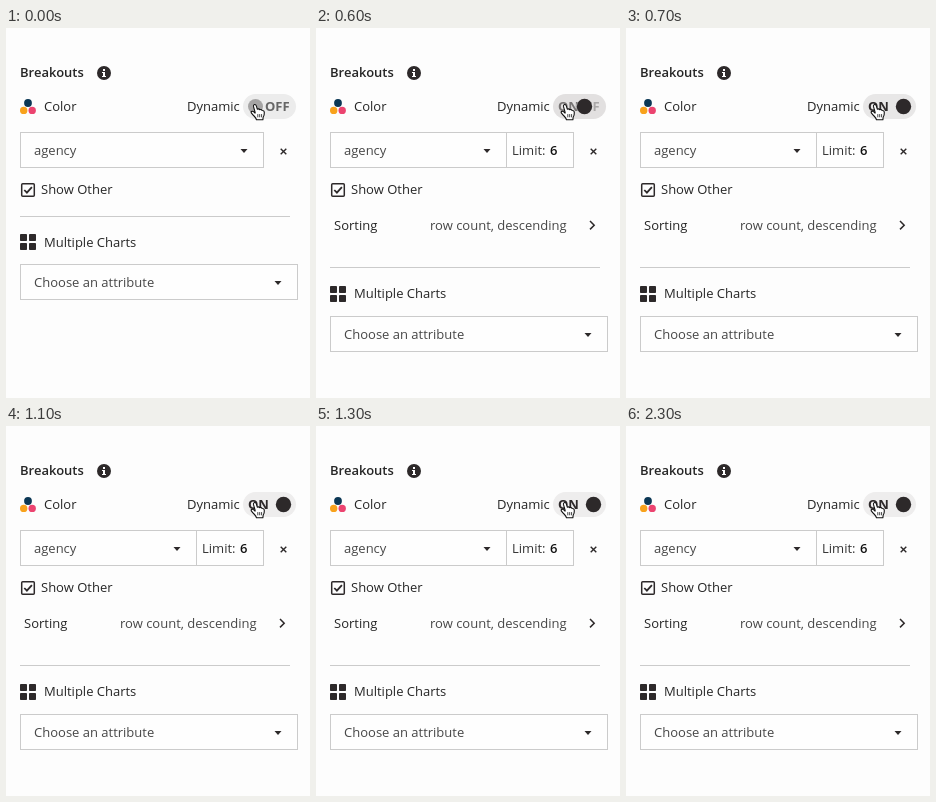
Animation of 304 by 370 pixels, one loop 2.4 s. Source, as an HTML page with a canvas:

```html
<!DOCTYPE html>
<html lang="en">
<head>
<meta charset="utf-8">
<title>Breakouts panel</title>
<style>
html, body { margin: 0; width: 100%; height: 100%; overflow: hidden; background: #fdfdfd; }
canvas { display: block; width: 304px; height: 370px; }
</style>
</head>
<body>
<canvas id="stage"></canvas>
<script>
const W = 304, H = 370, LOOP = 2400;
const INK = '#2d292a', TEXT = '#262626', SOFT = '#474747', LINE = '#cbcbcb';
const canvas = document.getElementById('stage');
const ctx = canvas.getContext('2d');
const dpr = window.devicePixelRatio || 1;
canvas.width = W * dpr;
canvas.height = H * dpr;

const hand = new Path2D('M4.6 8.6L3 3.2Q2.6 1.3 4 1Q5.4 .8 5.9 2.6L6.8 5.6Q8.8 5 9.3 6.2' +
  'Q11.1 5.7 11.6 7Q13.6 6.8 13.8 9Q14 12 12.6 14L12.4 16.3L6 16.3Q5.6 14.6 4 13' +
  'Q2 11 .8 9.4Q.2 8 1.6 7.8Q3 7.6 4.6 9.6Z');

function text(str, x, y, color = TEXT, weight = 400) {
  ctx.font = `${weight} 13px "Open Sans", "Noto Sans", sans-serif`;
  ctx.fillStyle = color;
  ctx.fillText(str, x, y);
}

function rect(x, y, w, h, color) {
  ctx.fillStyle = color;
  ctx.fillRect(x, y, w, h);
}

function round(x, y, w, h, r, color) {
  ctx.fillStyle = color;
  ctx.beginPath();
  ctx.roundRect(x, y, w, h, r);
  ctx.fill();
}

function dot(x, y, r, color) {
  ctx.fillStyle = color;
  ctx.beginPath();
  ctx.arc(x, y, r, 0, Math.PI * 2);
  ctx.fill();
}

function stroke(path, color, width) {
  ctx.strokeStyle = color;
  ctx.lineWidth = width;
  ctx.stroke(new Path2D(path));
}

function box(x, y, w, h) {
  rect(x, y, w, h, LINE);
  rect(x + 1, y + 1, w - 2, h - 2, '#fefefe');
}

function caret(x, y) {
  ctx.fillStyle = INK;
  ctx.fill(new Path2D(`M${x - 3.5} ${y - 2}h7l-3.5 4z`));
}

function drawHeader() {
  text('Breakouts', 14, 49, TEXT, 600);
  dot(98, 45, 7, INK);
  rect(97, 41, 2, 2, '#fff');
  rect(97, 44, 2, 5, '#fff');
  rect(96, 44, 1, 1, '#fff');
  rect(96, 48, 4, 1, '#fff');
  dot(22, 75, 3.9, '#0b3755');
  dot(17.7, 82.4, 3.7, '#f8a21c');
  dot(26.2, 82.4, 3.7, '#ec4470');
  text('Color', 38, 83);
  text('Dynamic', 181, 83);
}

function drawFields(open) {
  box(14, 104, 244, 36);
  text('agency', 28, 127, SOFT);
  caret(open ? 171 : 238, 123);
  if (open) {
    rect(190, 104, 1, 36, LINE);
    text('Limit:', 196, 127, '#333');
    text('6', 234, 127, '#111', 600);
  }
  stroke('M274.7 120.7l5.6 5.6m0-5.6l-5.6 5.6', INK, 1.4);

  ctx.strokeStyle = INK;
  ctx.lineWidth = 1.5;
  ctx.beginPath();
  ctx.roundRect(15.7, 155.7, 12.6, 12.6, 1);
  ctx.stroke();
  stroke('M18.3 162l2.6 2.7 5-5.6', INK, 1.8);
  text('Show Other', 35, 166);

  if (open) {
    text('Sorting', 18, 202);
    text('row count, descending', 114, 202, SOFT);
    stroke('M274 193l4.2 4.2-4.2 4.2', INK, 1.5);
  }
}

function drawCharts(open) {
  rect(14, open ? 239 : 188, 270, 1, LINE);
  const top = open ? 258 : 206;
  for (let i = 0; i < 4; i++) {
    round(14 + (i % 2) * 9, top + (i >> 1) * 9, 7, 7, 0.8, INK);
  }
  text('Multiple Charts', 38, open ? 270 : 219);
  const y = open ? 288 : 236;
  box(14, y, 278, 36);
  text('Choose an attribute', 28, y + 23, SOFT);
  caret(272, y + 19);
}

function drawToggle(t) {
  const pill = t < 400 ? '#ececec' : t < 700 ? '#e2e0e0' : t < 900 ? '#e8e7e7' : '#eeeded';
  round(237, 66, 53, 25, 12.5, pill);
  if (t < 600) {
    text('OFF', 259, 83, '#666', 700);
    dot(249.5, 78.5, 7.5, '#a5a4a4');
  } else if (t < 700) {
    text('ON', 242, 83, '#777474', 700);
    text('OFF', 259, 83, '#aaa8a8', 700);
    dot(268.5, 78.5, 7.7, INK);
  } else {
    text('ON', 242, 83, INK, 700);
    dot(277.5, 78.5, 7.7, INK);
  }
}

function drawHand() {
  ctx.save();
  ctx.translate(244.5, 75.5);
  ctx.lineJoin = 'round';
  ctx.fillStyle = '#fff';
  ctx.fill(hand);
  ctx.strokeStyle = '#111';
  ctx.lineWidth = 1.1;
  ctx.stroke(hand);
  stroke('M7.3 10.6v3.2M9.2 10.6v3.2M11.1 10.6v3.2', '#111', 0.8);
  ctx.restore();
}

function draw(t) {
  const open = t >= 600;
  ctx.setTransform(dpr, 0, 0, dpr, 0, 0);
  rect(0, 0, W, H, '#fdfdfd');
  drawHeader();
  drawFields(open);
  drawCharts(open);
  drawToggle(t);
  drawHand();
}

const start = performance.now();
function tick() {
  draw((performance.now() - start) % LOOP);
  requestAnimationFrame(tick);
}
tick();
</script>
</body>
</html>
```
